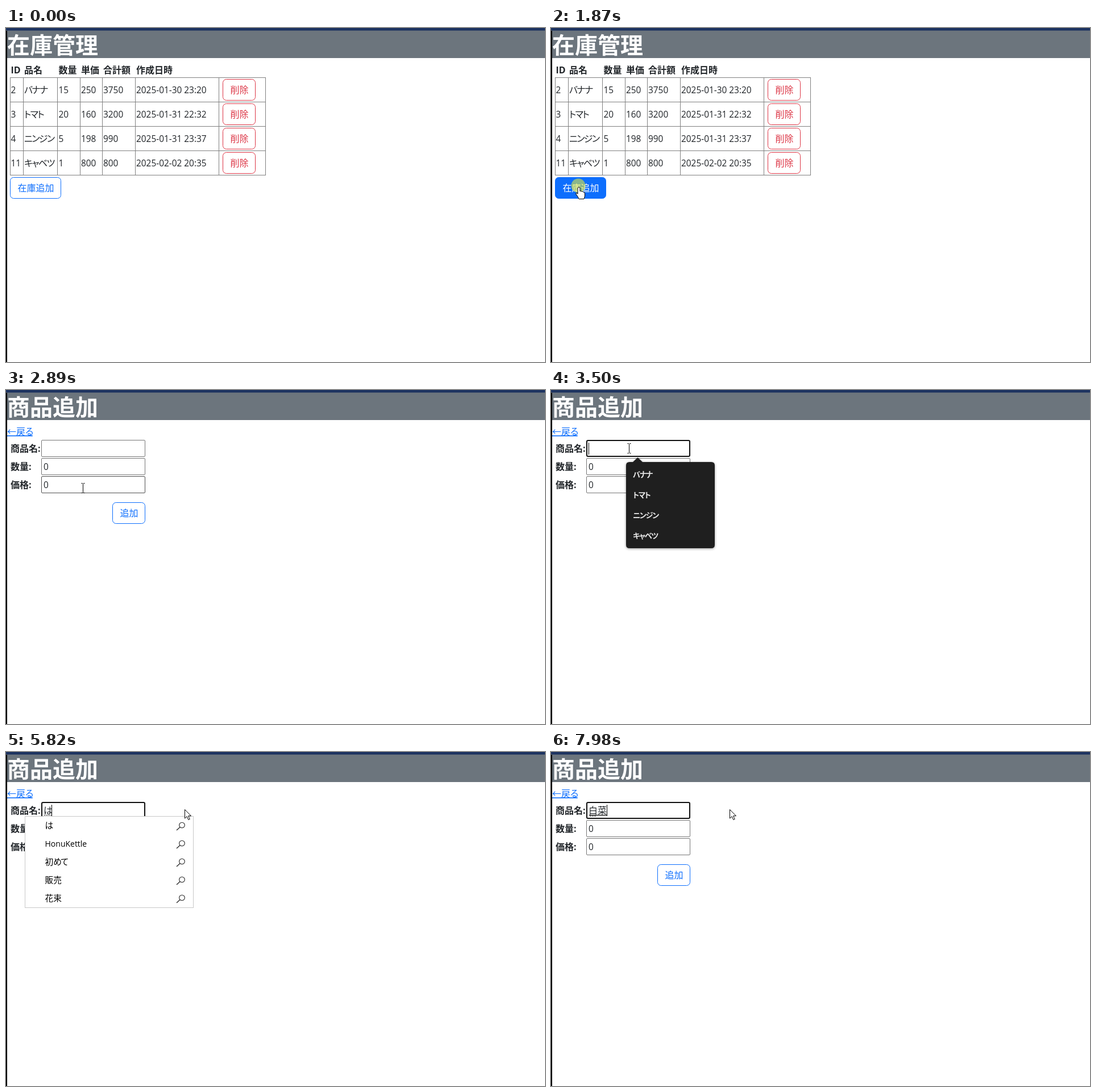
An HTML page that plays this animation: 948 px wide and 589 px high, repeating every 8000 ms.

```html
<!DOCTYPE html>
<html lang="ja">
<head>
<meta charset="utf-8">
<title>在庫管理</title>
<style>
  html, body { margin: 0; width: 100%; height: 100%; overflow: hidden; background: #fff; }
  svg { display: block; width: 100%; height: 100%; }
  text { font-family: "Open Sans", "Noto Sans CJK JP", "Noto Sans CJK", sans-serif; white-space: pre; }
  .kana { font-feature-settings: "palt"; letter-spacing: -.1em; }
</style>
</head>
<body>
<svg id="stage" viewBox="0 0 948 589"></svg>
<script>
const LOOP = 8000, STEP = 200 / 3;
const BLUE = '#0d6efd', RED = '#dc3545', INK = '#212529';
const stage = document.getElementById('stage');

const rect = (x, y, w, h, attrs) => `<rect x="${x}" y="${y}" width="${w}" height="${h}" ${attrs}/>`;
const path = (d, attrs) => `<path d="${d}" ${attrs}/>`;
const text = (x, y, value, size = 16, fill = INK, attrs = '') =>
  `<text x="${x}" y="${y}" font-size="${size}" fill="${fill}" ${attrs}>` +
  value.replace(/[ぁ-ヶー]+/g, '<tspan class="kana">$&</tspan>') + '</text>';
const bold = (x, y, value, size, fill) => text(x, y, value, size, fill, 'font-weight="700"');

const inside = (p, [x, y, w, h]) => p && p.x >= x && p.x < x + w && p.y >= y && p.y < y + h;
const latest = (rows, t) => rows.filter(row => row[0] <= t).pop();

const ADD_STOCK = [7, 263, 90, 38];
const FIELDS = [[62, 88, 183, 30], [62, 120, 183, 30], [62, 152, 183, 30]];

const STOCK = [
  ['2', 'バナナ', '15', '250', '3750', '2025-01-30 23:20'],
  ['3', 'トマト', '20', '160', '3200', '2025-01-31 22:32'],
  ['4', 'ニンジン', '5', '198', '990', '2025-01-31 23:37'],
  ['11', 'キャベツ', '1', '800', '800', '2025-02-02 20:35'],
];
const HEADINGS = ['ID', '品名', '数量', '単価', '合計額', '作成日時'];
const COLUMNS = [8.5, 32, 92.5, 132, 171, 229];

// Pointer moves: start time, end time, from, to
const MOVES = [
  [60, 940, [875, 575], [49, 280]],
  [1970, 2340, [49, 280], [129, 352]],
  [2470, 3170, [129, 352], [137, 103]],
  [3640, 4440, [137, 103], [314, 101]],
];
const CLICKS = [[1870, 2000], [3370, 3500]];
const PAGE_CHANGE = 2000, FOCUS = 3370, POPUP = 3430, TYPING = 5540;

// Composition: time, text, caret x
const TYPED = [
  [5540, 'ｈ', 82], [5680, 'は', 80], [6220, 'はｋ', 95], [6290, 'はく', 90],
  [6560, 'はくｓ', 105], [6960, 'はくさ', 101], [7230, 'はくさい', 114], [7910, '白菜', 98],
];
// Suggestions: time, right edge, words
const CABBAGE = ['白菜', '白菜漬け', '白菜キムチ', '白菜鍋', '白菜スープ'];
const SUGGESTIONS = [
  [5750, 329, ['は', 'HonuKettle', '初めて', '販売', '花束']],
  [6360, 329, ['白菜', '博物館', '拍手', '迫力', '白紙']],
  [6630, 237, ['白菜', '白紙', '白書', '博士', '白砂糖']],
  [7030, 219, ['白菜', '白山', '白山市', '白菜漬け', '白山神社']],
  [7440, 237, CABBAGE],
  [7580, 244, CABBAGE],
  [7910, 0, []],
];

function pointerAt(t) {
  const move = latest(MOVES, t);
  if (!move) return null;
  const [start, end, from, to] = move;
  const k = 1 - (1 - Math.min(1, (t - start) / (end - start))) ** 1.5;
  const mix = i => Math.round(from[i] + (to[i] - from[i]) * k);
  return { x: mix(0), y: mix(1) };
}

function button([x, y, w, h], label, color, hover) {
  return rect(x + .5, y + .5, w - 1, h - 1, `rx="6" fill="${hover ? color : '#fff'}" stroke="${color}"`) +
    text(x + 13.5, y + 25, label, 16, hover ? '#fff' : color);
}

function frame(title) {
  return rect(0, 0, 948, 589, 'fill="#fff"') + rect(2, 4, 946, 49, 'fill="#6c757d"') +
    rect(0, 0, 948, 4.5, 'fill="#1c3260"') + rect(0, 4.5, 2, 585, 'fill="#000"') +
    bold(2, 45, title, 40, '#fff');
}

function stockPage(pointer) {
  let out = frame('在庫管理') + HEADINGS.map((h, i) => bold(COLUMNS[i], 80, h)).join('');
  const lines = [7, 30, 90, 130, 169, 227, 374, 456].map(x => `M${x}.5 87V260`).join('') +
    [87, 130, 173, 216, 259].map(y => `M7 ${y}.5H457`).join('');
  out += path(lines, 'stroke="#808080" fill="none"');
  STOCK.forEach((row, r) => {
    const y = 87 + 43 * r;
    row.forEach((cell, i) => out += text(COLUMNS[i], y + 28, cell, i === 1 ? 16 : 15.4));
    out += button([381, y + 3, 58, 38], '削除', RED);
  });
  return out + button(ADD_STOCK, '在庫追加', BLUE, inside(pointer, ADD_STOCK));
}

function field(box, focused, hover) {
  const [x, y, w, h] = box;
  return focused
    ? rect(x + 1, y + 1, w - 2, h - 2, 'rx="2" fill="#fff" stroke="#101010" stroke-width="2"')
    : rect(x + .5, y + .5, w - 1, h - 1, `rx="1.5" fill="#fff" stroke="${hover ? '#4f4f4f' : '#767676'}"`);
}

function composition(t) {
  const typed = latest(TYPED, t);
  if (!typed) {
    const caretOn = Math.floor((t - FOCUS + 30) / 530) % 2 === 0;
    return caretOn ? rect(66, 93, 1, 21, 'fill="#000"') : '';
  }
  const [, value, caret] = typed;
  const converted = value === '白菜';
  return text(66, 109, value) + rect(caret, 93, 1, 20, 'fill="#000"') +
    path(`M67 111.5H${caret}`, `stroke="#222" ${converted ? 'stroke-width="1.5"' : 'stroke-dasharray="2 1"'}`) +
    (converted ? path('M68 113H79', 'stroke="#222" stroke-dasharray="3 1"') : '');
}

function autofill() {
  return path('M138 127H144L152.500 119L161 127H282Q288 127 288 133V273Q288 279 282 279H138Q132 279 132 273V133Q132 127 138 127Z',
    'fill="#1f1f1f" style="filter:drop-shadow(0 1px 2px #0006)"') +
    STOCK.map((row, i) => bold(144, 154 + 36 * i, row[1], 13.3, '#e8e8e8')).join('');
}

function suggestions(t) {
  const [, right, words] = latest(SUGGESTIONS, t) || [0, 0, []];
  if (!words.length) return '';
  return rect(33.5, 113.5, right - 33, 161, 'fill="#fff" stroke="#c8c8c8"') +
    words.map((word, i) => {
      const y = 129 + 32 * i;
      return text(68.5, y + 6, word, /^[A-Z]/.test(word) ? 14 : 14.7, '#000') +
        `<circle cx="${right - 19.5}" cy="${y}" r="4.8" fill="none" stroke="#222" stroke-width="1.1"/>` +
        path(`M${right - 23} ${y + 3.5}L${right - 29} ${y + 9}`, 'stroke="#222" stroke-width="1.2"');
    }).join('');
}

function formPage(t, pointer) {
  const focused = t >= FOCUS;
  let out = frame('商品追加') + text(2, 79, '←戻る', 16, BLUE, 'text-decoration="underline"');
  ['商品名:', '数量:', '価格:'].forEach((label, i) => {
    out += bold(8, 109 + 32 * i, label) +
      field(FIELDS[i], focused && i === 0, inside(pointer, FIELDS[i])) +
      (i ? text(66, 109 + 32 * i, '0', 15.4) : '');
  });
  out += button([187, 198, 58, 38], '追加', BLUE);
  if (focused) out += composition(t);
  if (t >= POPUP && t < TYPING) out += autofill();
  return out + suggestions(t);
}

function pointerShape(p, t, onForm) {
  if (!p) return '';
  let shape;
  if (onForm && FIELDS.some(box => inside(p, box))) {
    shape = path('M-3 -8.500H-1L0 -7.500L1 -8.500H3M0 -7.500V7.500M-3 8.500H-1L0 7.500L1 8.500H3',
      'transform="translate(.5 0)" fill="none" stroke="#000"');
  } else if (!onForm && inside(p, ADD_STOCK)) {
    shape = path('M-2 2Q0 -1 2 2V8Q4 6.500 5 8.500Q7 7.500 8 9.500Q10.500 9 10.500 12V16Q10 18 9 21.500H0Q-1 18 -5 13Q-6 10 -3 11L-2 12.500Z',
      'fill="#fff" stroke="#000" stroke-linejoin="round"');
  } else {
    shape = path('M.5 .5V16L4.200 12.600L6.800 18.500L9.200 17.500L6.700 11.700H11.500Z', 'fill="#fff" stroke="#000"');
  }
  const pressed = CLICKS.some(([from, to]) => t >= from && t < to);
  const halo = pressed ? '<circle cx="-1" cy="-2" r="12.500" fill="#f2f230" fill-opacity=".55"/>' : '';
  return `<g transform="translate(${p.x} ${p.y})">${halo}${shape}</g>`;
}

let shown = '';
function draw(now) {
  const t = now % LOOP;
  const onForm = t >= PAGE_CHANGE;
  const tick = Math.floor((t + 1) / STEP) * STEP + 4;
  const pointer = pointerAt(tick);
  const picture = (onForm ? formPage(t, pointer) : stockPage(pointer)) + pointerShape(pointer, t, onForm);
  if (picture !== shown) stage.innerHTML = shown = picture;
  requestAnimationFrame(() => draw(performance.now() - began));
}
const began = performance.now();
draw(0);
</script>
</body>
</html>
```
